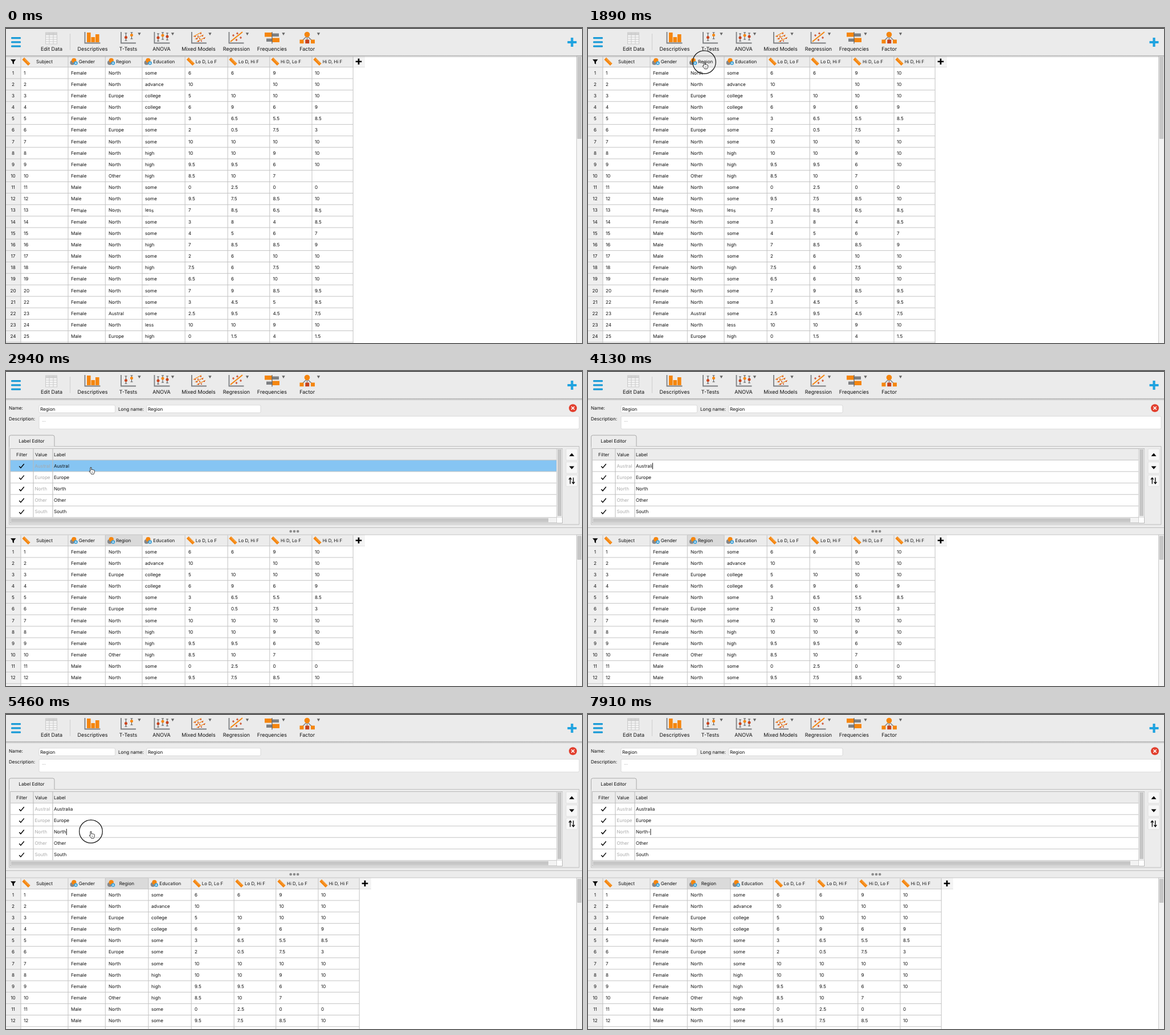
An HTML page that plays this animation: 1011x554 px, repeating every 8000 ms.

```html
<!DOCTYPE html>
<html lang="en">
<head>
<meta charset="utf-8">
<title>Label editor</title>
<style>
html, body { margin: 0; width: 100%; height: 100%; overflow: hidden; background: #fff; }
svg { display: block; width: 100vw; height: 100vh; }
/* The tiny turn keeps baselines from snapping to whole pixels */
text { font-family: Inter, "Open Sans", sans-serif; text-rendering: geometricPrecision; white-space: pre;
  transform-box: fill-box; transform-origin: center; transform: rotate(.02deg); }
</style>
</head>
<body>
<svg id="stage" viewBox="0 0 1011 554" xmlns="http://www.w3.org/2000/svg"></svg>
<script>
const INK = '#111', LINE = '#c3c3c3', PANEL = '#ececec', ORANGE = '#f5860f', GREY = '#7d7f82', RED = '#c8421c', BLUE = '#1a9bd7';
const THUMB = '#c6c6c6', LOOP = 8000, TICK = 70, PITCH = 20.16, OPEN_SHIFT = 239, WIDEN = 11;

// Drawing helpers
const rect = (x, y, w, h, fill, extra = '') => `<rect x="${x}" y="${y}" width="${w}" height="${h}" fill="${fill}" ${extra}/>`;
const path = (d, fill = 'none', stroke = 'none', width = 1, extra = '') =>
  `<path d="${d}" fill="${fill}" stroke="${stroke}" stroke-width="${width}" ${extra}/>`;
const line = (x1, y1, x2, y2, stroke = LINE, width = 1) => path(`M${x1} ${y1}L${x2} ${y2}`, 'none', stroke, width);
const dot = (x, y, r, fill, extra = '') => `<circle cx="${x}" cy="${y}" r="${r}" fill="${fill}" ${extra}/>`;
const label = (x, midY, str, { size = 8.1, anchor = 'start', fill = INK, id = '' } = {}) =>
  `<text ${id && `id="${id}"`} x="${x}" y="${midY + size * .32}" font-size="${size}" text-anchor="${anchor}" fill="${fill}">${str}</text>`;
const group = (id, body) => `<g id="${id}">${body}</g>`;

// Toolbar
const axes = (x, w) => path(`M${x} 7V26.5H${x + w}`, 'none', GREY, 1.8);
const whisker = (x, top, bottom, mid, fill) =>
  path(`M${x - 2} ${top}h4M${x - 2} ${bottom}h4M${x} ${top}V${bottom}`, 'none', '#555', 1) + dot(x, mid, 2.5, fill);
const cross = (x, y) => path(`M${x - 2} ${y}h4M${x} ${y - 2}v4`, 'none', RED, 1.2);

function toolbarIcons() {
  const bars = [[142, 8], [149.5, 16], [157, 11]].map(([x, y]) => rect(x, y, 6.6, 25 - y, ORANGE)).join('');
  let table = rect(69.5, 8, 20, 20, '#f6f6f6', 'stroke="#c9c9c9"') + rect(69.5, 8, 20, 4, '#d2d2d2');
  for (let i = 1; i < 5; i++) table += line(69.5, 8 + i * 4, 89.5, 8 + i * 4, '#c9c9c9');
  table += line(76, 8, 76, 28, '#c9c9c9') + line(83, 8, 83, 28, '#c9c9c9');
  const tTests = axes(202, 26) + whisker(210.5, 9, 22, 16.5, RED) + whisker(220.5, 8, 19, 12.5, ORANGE);
  const anova = axes(260.5, 27) + whisker(267, 10, 23, 17, RED) + whisker(275, 8, 20, 13, ORANGE) + whisker(283, 9, 21, 15, RED);
  let mixed = axes(326, 26);
  for (let i = 0; i < 3; i++) {
    mixed += line(329 + i * 3, 15 + i * 4.5, 343 + i * 3.5, 7.5 + i * 4.5, ORANGE, 1.3);
    for (let j = 0; j < 3; j++) mixed += dot(332 + i * 3 + j * 5, 15 + i * 4.2 - j * 2.6 + (j % 2) * 2, 1.1, RED);
  }
  const regression = axes(391.5, 26) + line(394, 24, 415, 7, ORANGE, 2) +
    cross(399, 13) + cross(406, 9.5) + cross(404.5, 21) + cross(412, 17);
  const freq = rect(454, 8, 13, 7.5, ORANGE) + rect(467, 9.5, 12, 5.5, GREY) +
    rect(457, 18.5, 10, 5.5, GREY) + rect(467, 17.5, 13, 7.5, ORANGE) + line(467, 7, 467, 27.5, '#666', 1.3);
  const factor = path('M528.5 14L519 23M528.5 14V23M528.5 14L538 23', 'none', GREY, 1.5) + dot(528.5, 11.5, 4.8, ORANGE) +
    [515.5, 525.3, 535].map((x, i) => rect(x, 20.5, 7, 6.7, i === 1 ? RED : ORANGE)).join('');
  return table + axes(138.5, 27) + bars + tTests + anova + mixed + regression + freq + factor;
}

function toolbar() {
  const names = [['Edit Data', 80], ['Descriptives', 152], ['T-Tests', 214.5], ['ANOVA', 273], ['Mixed Models', 338],
    ['Regression', 404.5], ['Frequencies', 467], ['Factor', 528.7]];
  return `<defs><linearGradient id="shade" x2="0" y2="1"><stop stop-color="#adadad"/><stop offset="1" stop-color="#adadad" stop-opacity="0"/></linearGradient></defs>` +
    rect(0, 0, 1011, 48.5, '#ebebeb') + rect(0, 0, 1011, 1.2, '#151515') + rect(0, 48.2, 1011, 4, 'url(#shade)') +
    [15.9, 23.2, 30.4].map(y => rect(9, y, 17, 3.3, BLUE, 'rx="1.3"')).join('') +
    path('M985.5 25h16M993.5 17v16', 'none', '#1fa3e0', 4.2) +
    line(112.5, 10, 112.5, 39, '#cfcfcf') + toolbarIcons() +
    [234, 292.5, 358, 423.5, 487, 548.5].map(x => path(`M${x - 2.7} 8.3h5.4l-2.7 4.6z`, '#666')).join('') +
    names.map(([s, x]) => label(x, 36.9, s, { size: 9, anchor: 'middle' })).join('');
}

// Data grid
const rows = `F N some 6 6 9 10|F N advance 10 - 10 10|F E college 5 10 10 10|F N college 6 9 6 9|F N some 3 6.5 5.5 8.5
F E some 2 0.5 7.5 3|F N some 10 10 10 10|F N high 10 10 9 10|F N high 9.5 9.5 6 10|F O high 8.5 10 7 -
M N some 0 2.5 0 0|M N some 9.5 7.5 8.5 10|F N less 7 8.5 6.5 8.5|F N some 3 8 4 8.5|M N some 4 5 6 7
M N high 7 8.5 8.5 9|M N some 2 6 10 10|F N high 7.5 6 7.5 10|F N some 6.5 6 10 10|F N some 7 9 8.5 9.5
F N some 3 4.5 5 9.5|F A some 2.5 9.5 4.5 7.5|F N less 10 10 9 10|M E high 0 1.5 4 1.5`.split(/[|\n]/).map(r => r.split(' '));
const words = { F: 'Female', M: 'Male', N: 'North', E: 'Europe', O: 'Other', A: 'Austral', '-': '' };

const ruler = x => `<g transform="translate(${x} 59) rotate(45)">` + rect(-7.5, -2.7, 15, 5.4, ORANGE, 'rx=".6"') +
  path('M-5 -2.7v2M-2.5 -2.7v2.6M0 -2.7v2M2.5 -2.7v2.6M5 -2.7v2', 'none', '#fbd9a8', .8) + '</g>';
const nominal = x => dot(x - 2.3, 61, 4, '#85878a') + dot(x + .5, 57, 4.1, ORANGE) + dot(x + 3.7, 61.8, 3.3, '#3aa0d8') +
  path(`M${x + 2.3} 63.6l1.4 -3.6l1.4 3.6M${x + 2.8} 62.5h1.8`, 'none', '#fff', .7);

function cells(first, last, xs) {
  return rows.map((r, i) => r.slice(first, last).map((v, c) => label(xs[c], 79 + i * PITCH, words[v] ?? v)).join('')).join('');
}
const rowLines = (x1, x2, top, count) =>
  Array.from({ length: count }, (_, i) => line(x1, top + i * PITCH, x2, top + i * PITCH)).join('');
const colLines = xs => xs.map(x => line(x, 50, x, 554)).join('');

function grid() {
  const left = rect(0, 49, 250, 20, PANEL) + rect(0, 69, 26, 490, '#efefef') +
    rect(174, 49, 76, 20, '#dadada', 'id="selected"') + rowLines(0, 250, 68.8, 25) + colLines([26, 109, 174.3]) +
    path('M8 55.3h9.4l-3.5 4.2v4.2l-2.4 -1.5v-2.7z', '#000') + ruler(35.5) + label(67.5, 59, 'Subject', { anchor: 'middle' }) +
    nominal(118.8) + label(127.8, 59, 'Gender') + nominal(184.3) + label(193, 59, 'Region', { id: 'regionHead' }) +
    rows.map((r, i) => label(12.5, 79 + i * PITCH, i + 1, { anchor: 'middle' }) +
      label(31, 79 + i * PITCH, i < 20 ? i + 1 : i + 2)).join('') + cells(0, 2, [114, 180]);
  const heads = [['Lo D, Lo F', 324, 351.5], ['Lo D, Hi F', 398.5, 426], ['Hi D, Lo F', 472.5, 500], ['Hi D, Hi F', 546.5, 573]];
  const right = rect(239, 49, 391, 20, PANEL) + rect(609.5, 49, 20.5, 19.5, '#f4f4f4') + rowLines(239, 609, 68.8, 25) +
    line(609, 68.8, 630, 68.8, '#e0e0e0') + colLines([239, 314.2, 389.2, 462.8, 537, 609.2]) + nominal(249) + label(258.3, 59, 'Education') +
    heads.map(([s, icon, x]) => ruler(icon) + label(x, 59, s, { size: 7.9, anchor: 'middle' })).join('') +
    path('M613.7 59h10.6M619 53.7v10.6', 'none', '#000', 2.7) + cells(2, 7, [244, 320, 395, 468.5, 542]);
  return left + group('right', right);
}

// Variable panel
const field = (x, y, w, h) => rect(x, y, w, h, '#fff', 'stroke="#d3d3d3" stroke-width=".8" rx="2"');
const regions = ['Austral', 'Europe', 'North', 'Other', 'South'];
const rowMid = i => 167 + i * PITCH;

function panel() {
  const box = rect(0, 48, 1011, 240, PANEL) +
    label(5, 65, 'Name:') + field(58, 60, 133.5, 13.5) + label(60, 67, 'Region') +
    label(197, 67, 'Long name:') + field(247, 60, 200, 13.5) + label(249, 67, 'Region') +
    label(5, 84.2, 'Description:') + field(58, 79.5, 948, 22.5) + label(63, 86.5, '...', { fill: '#999' }) +
    dot(995, 65.2, 7, '#e2402f') + path('M992.3 62.5l5.4 5.4M997.7 62.5l-5.4 5.4', 'none', '#fff', 1.5) +
    path('M5.5 270V132.5H1006V270z', 'none', '#bdbdbd') + path('M5.5 133.5V116q0 -3 3 -3H82q3 0 3 3V132.5', PANEL, '#a9a9a9') +
    label(45, 123, 'Label Editor', { anchor: 'middle' });
  const table = rect(7.5, 136.5, 969, 131, '#fff', 'stroke="#b9b9b9"') + rect(8, 137, 958, 20, PANEL) +
    rect(8, 157, 958, 20, '#86c5f3', 'id="highlight"') + rowLines(8, 966, 156.7, 6) +
    [48, 82].map(x => line(x, 137, x, 257, '#b9b9b9')).join('') +
    rect(966.5, 137, 10, 120, '#f3f3f3', 'stroke="#c6c6c6" stroke-width=".8"') + rect(968, 138, 7, 117, THUMB) +
    rect(8, 257.5, 958.5, 9.5, '#f3f3f3', 'stroke="#c6c6c6" stroke-width=".8"') + rect(9, 258.8, 943, 7, THUMB) +
    label(27.7, 147, 'Filter', { anchor: 'middle' }) + label(51, 147, 'Value') + label(84, 147, 'Label') +
    regions.map((s, i) => {
      const y = rowMid(i);
      return path(`M23.2 ${y + .6}l2.7 2.9l5.8 -7`, 'none', '#000', 1.4) +
        label(50.5, y, s, { fill: '#a9a9a9' }) + label(84, y, s, { id: 'label' + i });
    }).join('') + rect(0, 0, .9, 11, '#000', 'id="caret"');
  const buttons = [137, 160, 183].map(y => rect(983, y, 20, 20, '#f7f7f7', 'stroke="#d8d8d8" stroke-width=".7" rx="1"')).join('') +
    path('M988.5 149.7h9l-4.5 -5.2z M988.5 167.5h9l-4.5 5.2z', '#000') +
    path('M990.3 198.5v-10.3m-2.4 2.7l2.4 -3l2.4 3M995.8 187.5v10.3m-2.4 -2.7l2.4 3l2.4 -3', 'none', '#000', 1.3);
  const splitter = line(0, 275.5, 1011, 275.5, '#bcbcbc') + line(0, 288, 1011, 288) +
    [499.7, 506, 512.2].map(x => dot(x, 282, 2.3, '#8c8c8c')).join('');
  return box + table + buttons + splitter;
}

// Pointers are drawn with their hot spot at the origin
const pointers =
  group('arrow', path('M0 0V10.2l2.4 -2.2l1.6 3.5l1.6 -.7l-1.6 -3.4h3.4z', '#000', '#fff', .7)) +
  group('beam', path('M-2.3 -4.6q2.3 0 2.3 1.4q0 -1.4 2.3 -1.4M0 -3.2V4.6M-2.3 6q2.3 0 2.3 -1.4q0 1.4 2.3 1.4M-1.3 1.8h2.6', 'none', '#222', 1)) +
  group('hand', path('M-1 .2q1 -1 2 0V4.2q1 -.9 1.9 0q1.1 -.7 1.8 .3q1.5 -.4 1.7 1V8q0 2 -1.2 3V11.6H.6V11L-2.7 7.2q-.2 -1.2 1.1 -1l.6 .7z', '#fff', '#222', .9, 'stroke-linejoin="round"') +
    path('M1.8 7v2.5M3.4 7v2.5', 'none', '#444', .6));

const byId = id => document.getElementById(id);
byId('stage').innerHTML = rect(0, 0, 1011, 554, '#fff') + group('grid', grid()) + group('scroll',
  rect(1001.5, 49, 10, 510, '#f3f3f3', 'stroke="#c9c9c9"') + rect(1002.6, 51, 7.6, 144, THUMB, 'id="thumb" rx="1"')) +
  group('panel', panel()) + toolbar() +
  group('pointer', dot(0, -.2, 20.3, 'none', 'id="ring" stroke="#111" stroke-width="1.2"') + pointers);

// Timeline: [time, x, y] of the pointer's hot spot
const track = [[70, 463, 412], [140, 447, 411], [280, 447, 411], [490, 294, 207], [630, 294, 207], [910, 271, 45], [1050, 271, 45],
  [1400, 204, 60.3], [2170, 204, 60.3], [2590, 149, 169.7], [3570, 149, 169.7], [3640, 150.5, 169.5], [4550, 150.5, 169.5], [4900, 149, 206.8]];
const clicks = [[1540, 1960], [2660, 2940], [3220, 3360], [5040, 5180], [5320, 5600]];
const caretOn = [[3290, 3850], [4130, 4830], [5390, 6020], [6510, 7070], [7560, LOOP]];
const within = (t, spans) => spans.some(([a, b]) => t >= a && t < b);
const show = (id, on) => byId(id).style.display = on ? '' : 'none';

function pointerAt(t) {
  const next = track.findIndex(k => k[0] > t);
  if (next < 0) return track[track.length - 1].slice(1);
  if (next === 0) return track[0].slice(1);
  const [t0, x0, y0] = track[next - 1], [t1, x1, y1] = track[next];
  const u = (t - t0) / (t1 - t0), e = u * u * (3 - 2 * u);
  return [x0 + (x1 - x0) * e, y0 + (y1 - y0) * e];
}

function render(t) {
  const open = t >= 1960, wide = t >= 5180;
  show('panel', open);
  show('selected', open);
  for (const id of ['grid', 'scroll']) byId(id).setAttribute('transform', `translate(0 ${open ? OPEN_SHIFT : 0})`);
  byId('thumb').setAttribute('height', open ? 42 : 144);
  byId('right').setAttribute('transform', `translate(${wide ? WIDEN : 0} 0)`);
  byId('regionHead').setAttribute('x', wide ? 198.7 : 193);

  byId('label0').textContent = t < 4130 ? 'Austral' : t < 4340 ? 'Australi' : 'Australia';
  byId('label2').textContent = t < 7910 ? 'North' : 'North-';
  const active = wide ? 2 : 0;
  show('highlight', within(t, [[2940, 3290], [5180, 5390]]));
  byId('highlight').setAttribute('y', 156.8 + active * PITCH);
  show('caret', within(t, caretOn));
  if (open) {
    byId('caret').setAttribute('x', 84.2 + byId('label' + active).getComputedTextLength());
    byId('caret').setAttribute('y', rowMid(active) - 5.4);
  }

  const [x, y] = pointerAt(t);
  const kind = t < 1190 ? 'arrow' : !open ? 'hand' : y < 75 ? 'beam' : y < 157 ? 'arrow' : 'hand';
  show('pointer', within(t, [[70, 4130], [4620, 7910]]));
  byId('pointer').setAttribute('transform', `translate(${x} ${y})`);
  for (const k of ['arrow', 'beam', 'hand']) show(k, k === kind);
  show('ring', within(t, clicks));
}

const start = performance.now();
function frame() {
  const t = (performance.now() - start) % LOOP;
  render(Math.floor(t / TICK) * TICK);
  requestAnimationFrame(frame);
}
frame();
</script>
</body>
</html>
```
